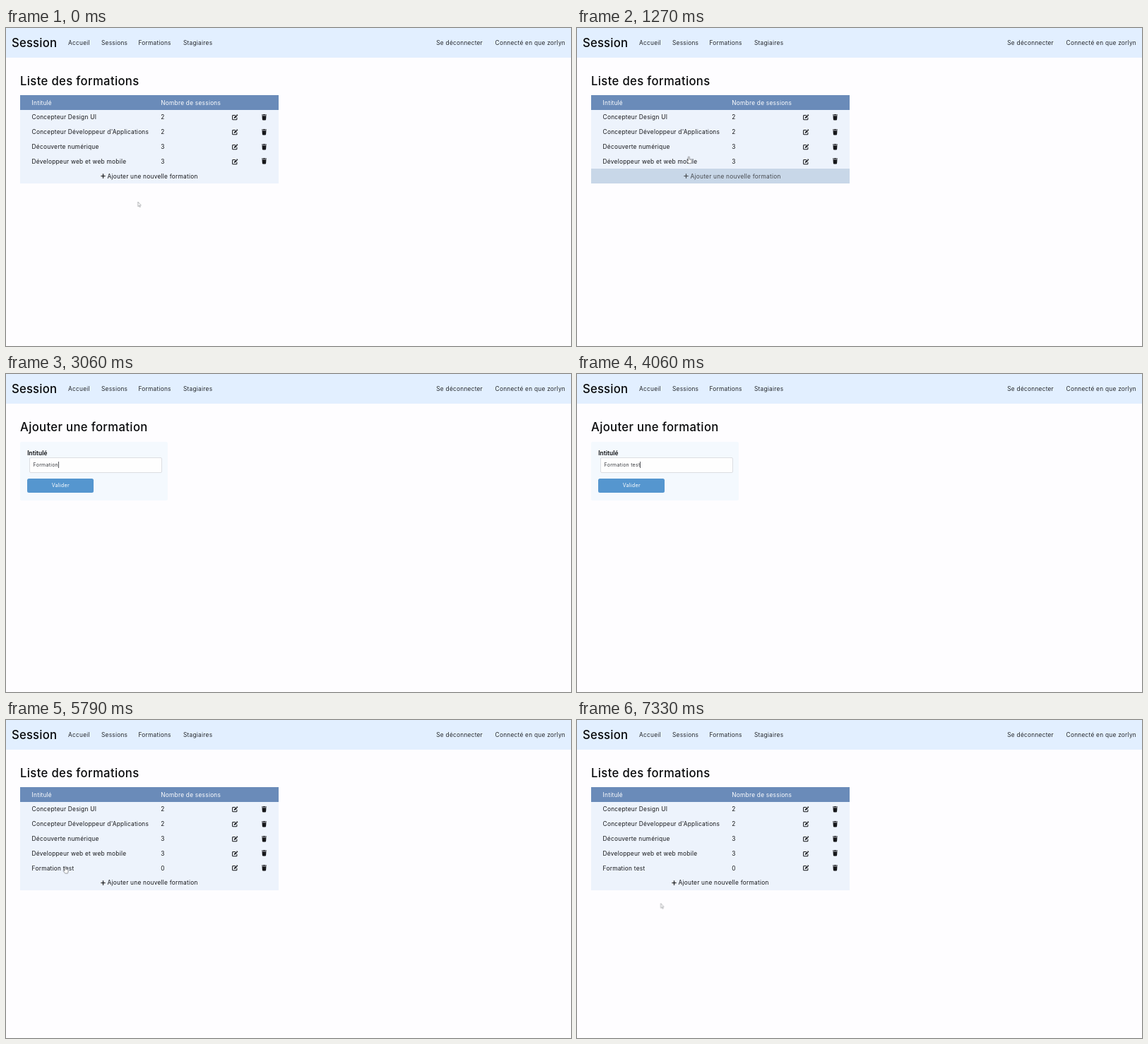
Recreate the animation shown at these times as an HTML page. Size 800 by 450 pixels, loop 7.42 s.

```html
<!DOCTYPE html>
<html lang="fr">
<head>
<meta charset="utf-8">
<title>Session</title>
<style>
  :root { --loop: 7420ms; --row: #edf3fc; --hover: #c8d7e8; --ink: #16171a; --soft: #46494e; }
  * { box-sizing: border-box; }
  html, body { margin: 0; width: 100%; height: 100%; overflow: hidden; background: #fefdff; }
  body {
    position: relative; color: var(--ink);
    font: 400 8.33px/20.8px Inter, "Open Sans", sans-serif; letter-spacing: .029em; white-space: nowrap;
  }
  .at, .page, .cell { position: absolute; }
  nav { position: absolute; inset: 0 0 auto; height: 41.5px; background: #e2efff; color: #25282c; }
  nav .at { top: 11px; }
  h1, .brand {
    position: absolute; margin: 0; color: #08090b;
    font-size: 16.67px; font-weight: 500; line-height: 24px; letter-spacing: .012em;
  }
  h1 { left: 20px; top: 63px; letter-spacing: .021em; }
  nav .brand { left: 8px; top: 9px; }

  .page { inset: 0; }
  .list { animation: list var(--loop) step-end infinite; }
  .form { animation: form var(--loop) step-end infinite; }
  @keyframes list { 0%, 76.55% { visibility: visible; } 18.6% { visibility: hidden; } }
  @keyframes form { 0%, 76.55% { visibility: hidden; } 18.6% { visibility: visible; } }

  .table { position: absolute; left: 20px; top: 95.3px; width: 366px; }
  .row { position: relative; height: 20.8px; overflow: hidden; background: var(--row); }
  .row.head { background: #6a8bb9; color: #fff; }
  .cell { left: 16.6px; top: .3px; }
  .count { left: 199.3px; }
  .icon { position: absolute; fill: currentColor; overflow: visible; }
  .edit { left: 300px; top: 6.2px; width: 8.4px; height: 8.4px; }
  .bin { left: 342px; top: 6px; width: 7px; height: 8.4px; }
  .plus { left: 114px; top: 6.8px; width: 7px; height: 7px; }
  .add .cell { left: 123.5px; }
  .add div { position: absolute; inset: 0; animation: shift var(--loop) ease infinite; }
  .add { animation: addHover var(--loop) ease infinite; }
  .fourth { animation: fourth var(--loop) ease infinite; }
  .fresh { animation: fresh var(--loop) step-end infinite, fifth var(--loop) ease infinite; }

  @keyframes fresh { 0% { height: 0; } 50%, 100% { height: 20.8px; } }
  @keyframes addHover {
    0%, 5.6%, 40%, 90.1%, 95.4%, 100% { background-color: var(--row); color: var(--ink); }
    9.6%, 18.7% { background-color: var(--hover); color: var(--soft); }
    92.5% { background-color: #dbe6f2; color: #34363b; }
  }
  @keyframes shift {
    0%, 5.6%, 40%, 90.1%, 95.4%, 100% { transform: none; }
    9.6%, 18.7% { transform: translateX(17px); }
    92.5% { transform: translateX(8px); }
  }
  @keyframes fourth {
    0%, 78.2%, 91.7%, 100% { background-color: var(--row); color: var(--ink); }
    82.2%, 86.9% { background-color: var(--hover); color: var(--soft); }
  }
  @keyframes fifth {
    0%, 86.9%, 95.1%, 100% { background-color: var(--row); color: var(--ink); }
    91.2% { background-color: var(--hover); color: var(--soft); }
  }

  .panel { position: absolute; left: 20px; top: 95.5px; width: 208.7px; height: 83.5px; background: #f4f9fe; border-radius: 2px; }
  .label { left: 10.2px; top: 6px; font-weight: 600; color: #08090b; letter-spacing: .01em; }
  .input {
    position: absolute; left: 13px; top: 22.5px; width: 188px; height: 21.5px; padding-left: 4.6px;
    border: 1px solid #dcdee2; border-radius: 2px; background: #fefefe; color: #3a3c40;
    font-size: 7px; line-height: 19.6px; white-space: pre;
  }
  #caret { display: inline-block; width: .8px; height: 9px; background: #5a5c60; vertical-align: -2px; }
  .button {
    position: absolute; left: 10.3px; top: 52.2px; width: 94px; height: 20.6px; border-radius: 2.5px;
    color: #fff; font-size: 7.2px; text-align: center; background: #5596cf;
    animation: press var(--loop) ease infinite;
  }
  @keyframes press { 0%, 68.6%, 78%, 100% { background: #5596cf; } 71.5%, 76.6% { background: #4a88c0; } }

  .cursor { position: absolute; left: 0; top: 0; width: 1px; height: 1px; animation: move var(--loop) ease-in-out infinite; }
  .cursor svg { position: absolute; left: 0; top: 0; width: 1px; height: 1px; overflow: visible; }
  .cursor path { fill: #fff; stroke-linejoin: round; }
  .arrow { stroke: #85878c; stroke-width: .6; animation: arrow var(--loop) step-end infinite; }
  .hand { stroke: #44464a; stroke-width: .6; animation: hand var(--loop) step-end infinite; }
  .beam { stroke: #3c3e42; stroke-width: .7; animation: beam var(--loop) step-end infinite; }
  @keyframes move {
    0%, .4% { transform: translate(186.8px, 246px); }
    8.1%, 14.15% { transform: translate(172px, 210px); animation-timing-function: ease-in; }
    17.12% { transform: translate(158.5px, 182.5px); animation-timing-function: ease-out; }
    20.2% { transform: translate(128px, 127px); }
    25.6%, 64.96% { transform: translate(124.5px, 125px); }
    70.08%, 75.2% { transform: translate(75px, 157px); }
    78.03% { transform: translate(84px, 207.5px); }
    82.2%, 85.5% { transform: translate(86px, 182px); }
    89.49% { transform: translate(87px, 216.5px); animation-timing-function: ease-out; }
    95.15%, 100% { transform: translate(118.6px, 259.5px); }
  }
  @keyframes arrow { 0%, 18.6%, 92.45% { opacity: 1; } 5.8%, 21.83% { opacity: 0; } }
  @keyframes hand { 0%, 18.6%, 92.45% { opacity: 0; } 5.8%, 68.19% { opacity: 1; } }
  @keyframes beam { 0%, 30.19%, 68.19% { opacity: 0; } 21.83%, 64.96% { opacity: 1; } }
</style>
</head>
<body>
<nav>
  <span class="brand">Session</span>
  <span class="at" style="left:88px">Accueil</span>
  <span class="at" style="left:135px">Sessions</span>
  <span class="at" style="left:187.4px">Formations</span>
  <span class="at" style="left:251px">Stagiaires</span>
  <span class="at" style="right:125px">Se déconnecter</span>
  <span class="at" style="right:8px">Connecté en que zorlyn</span>
</nav>

<main class="page list">
  <h1>Liste des formations</h1>
  <div class="table">
    <div class="row head"><span class="cell">Intitulé</span><span class="cell count">Nombre de sessions</span></div>
    <div class="row add"><div>
      <svg class="icon plus" viewBox="0 0 7 7"><path d="M2.9 .3h1.2v2.6h2.6v1.2H4.1v2.6H2.9V4.1H.3V2.9h2.6z"/></svg>
      <span class="cell">Ajouter une nouvelle formation</span>
    </div></div>
  </div>
</main>

<main class="page form">
  <h1>Ajouter une formation</h1>
  <div class="panel">
    <span class="at label">Intitulé</span>
    <div class="input"><span id="typed"></span><span id="caret"></span></div>
    <div class="button">Valider</div>
  </div>
</main>

<div class="cursor">
  <svg class="arrow"><path d="M0 0V6.6L1.5 5.3 2.5 7.6 3.4 7.2 2.4 5H4.4Z"/></svg>
  <svg class="hand"><path d="M-.9 .7a.9 .9 0 0 1 1.8 0V3.6l2.4 .6q1 .3 .9 1.4L3.8 8q-.2 1-.8 1.6H-.2L-2.9 6.2q-.4-.9 .4-1.2q.8 0 1.6 .8z"/></svg>
  <svg class="beam"><path d="M-1.5-3.5H1.5M0-3.5V3.5M-1.5 3.5H1.5"/></svg>
</div>

<script>
  const LOOP = 7420;
  const courses = [
    ["Concepteur Design UI", 2, ""],
    ["Concepteur Développeur d'Applications", 2, ""],
    ["Découverte numérique", 3, ""],
    ["Développeur web et web mobile", 3, "fourth"],
    ["Formation test", 0, "fresh"]
  ];
  const icons = `
    <svg class="icon edit" viewBox="0 0 9 9">
      <path d="M4.6 1.6H1.6Q.7 1.6 .7 2.5V7.4Q.7 8.3 1.6 8.3H6.5Q7.4 8.3 7.4 7.4V5.4" fill="none" stroke="currentColor" stroke-width="1.1" stroke-linecap="round"/>
      <path d="M2.9 6.3l.5-2L6.2 1.5l1.5 1.5L4.9 5.8zM6.6 1.1l.6-.6q.4-.4 .8 0l.7 .7q.4 .4 0 .8l-.6 .6z"/>
    </svg>
    <svg class="icon bin" viewBox="0 0 7 8.4">
      <path d="M0 .6H2L2.4 0H4.6L5 .6H7V1.6H0zM.5 2.2H6.5L6.1 7.6Q6 8.4 5.3 8.4H1.7Q1 8.4 .9 7.6z"/>
    </svg>`;
  document.querySelector(".head").insertAdjacentHTML("afterend", courses.map(([name, count, kind]) =>
    `<div class="row ${kind}"><span class="cell">${name}</span><span class="cell count">${count}</span>${icons}</div>`
  ).join(""));

  const text = "Formation test";
  const keys = [2060, 2240, 2340, 2450, 2560, 2660, 2760, 2860, 3000, 3270, 3360, 3450, 3610, 3730];
  const typed = document.getElementById("typed");
  const caret = document.getElementById("caret");
  const lastKey = keys[keys.length - 1];
  let start;

  function draw(now) {
    start ??= now;
    const t = (now - start) % LOOP;
    typed.textContent = text.slice(0, keys.filter(k => k <= t).length);
    const lit = t < lastKey || Math.floor((t - lastKey) / 530) % 2 === 0;
    caret.style.opacity = t > 1880 && t < 5350 && lit ? 1 : 0;
    requestAnimationFrame(draw);
  }
  requestAnimationFrame(draw);
</script>
</body>
</html>
```
